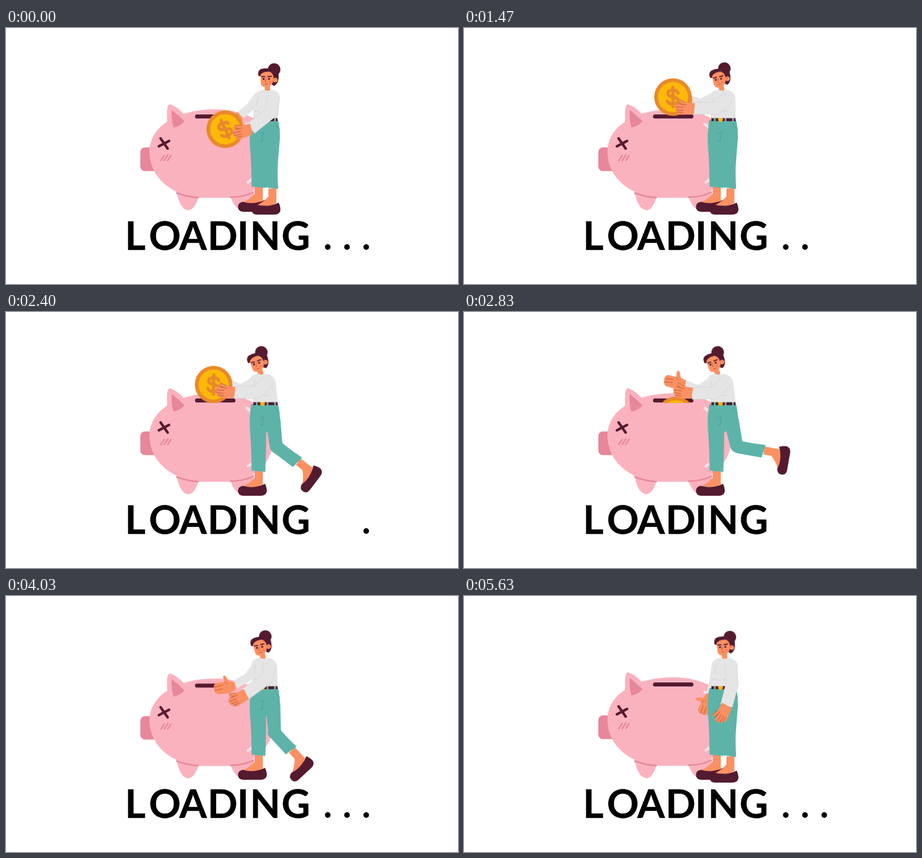
Write an HTML page that moves like this. It is 794 px wide and 450 px high and loops after 5.66 s.

```html
<!DOCTYPE html>
<html lang="en">
<head>
<meta charset="utf-8">
<title>Loading</title>
<style>
html, body { margin: 0; width: 100%; height: 100%; overflow: hidden; background: #fff; }
svg { display: block; width: 794px; height: 450px; }
text { font: 700 69.5px Lato, Inter, sans-serif; stroke: #000; stroke-width: .4; }

.pink { fill: #fbb2bf; }
.rose { fill: #e8869a; }
.skin { fill: #fb9062; }
.plum { fill: #541a30; }
.teal { fill: #5eb3a9; }
.cloth { fill: #e5e5e5; }
.line { fill: none; stroke-linecap: round; stroke-linejoin: round; }
.crease { stroke: #b9563f; stroke-width: 1; }
.fold { stroke: #d0d0d0; stroke-width: 1; }
.seam { stroke: #4b9c92; stroke-width: 1; }
.sleeve { fill: none; stroke: #e5e5e5; stroke-linejoin: round; }
.edge { stroke: #d2d2d2; }

.anim { animation: 5.66s linear infinite; }
.pig { animation-name: pig; transform-origin: 360px 320px; }
.coin { animation-name: coin; }
.front { animation-name: front; animation-timing-function: step-end; }
.slotted { animation-name: slotted; animation-timing-function: step-end; }
.torso { animation-name: torso; transform-origin: 456px 160px; }
.head { animation-name: head; transform-origin: 459px 108px; }
.thigh { animation-name: thigh; transform-origin: 462px 185px; }
.shank { animation-name: shank; transform-origin: 467px 238px; }
.far-arm { animation-name: far-arm; }
.far-hand { animation-name: far-hand; }
.near-arm { animation-name: near-arm; }
.near-hand { animation-name: near-hand; }
.dot { animation: 1886.667ms step-end infinite; }
.d1 { animation-name: dot1; }
.d2 { animation-name: dot2; }
.d3 { animation-name: dot3; }

@keyframes pig {
  0%, 51.5% { transform: scaleY(1); animation-timing-function: ease-out; }
  58% { transform: scaleY(.975); animation-timing-function: ease-in-out; }
  71.2% { transform: scaleY(.988); }
  81%, 100% { transform: scaleY(1); }
}
@keyframes coin {
  0%, 4% { transform: translate(385px, 178px) rotate(-25deg); animation-timing-function: cubic-bezier(.42, 0, .8, .7); }
  17.1% { transform: translate(374px, 142.5px) rotate(-6deg); animation-timing-function: ease-out; }
  30%, 35% { transform: translate(366px, 118px) rotate(0deg); }
  39% { transform: translate(363.5px, 119px) rotate(0deg); animation-timing-function: ease-in; }
  50% { transform: translate(372px, 181.5px) rotate(6deg); }
  53%, 100% { transform: translate(374px, 202px) rotate(8deg); }
}
@keyframes front { 0% { visibility: visible; } 36%, 100% { visibility: hidden; } }
@keyframes slotted { 0% { visibility: hidden; } 36%, 100% { visibility: visible; } }
@keyframes torso {
  0%, 4% { transform: skewX(0deg); animation-timing-function: ease-in; }
  17.1% { transform: skewX(-4deg); animation-timing-function: ease-in-out; }
  30%, 35% { transform: skewX(9deg); }
  48%, 60% { transform: skewX(12.4deg); animation-timing-function: ease-in; }
  71.2% { transform: skewX(7.5deg); animation-timing-function: ease-out; }
  85.3% { transform: skewX(1.5deg); }
  96%, 100% { transform: skewX(1deg); }
}
@keyframes head {
  0%, 4% { transform: none; animation-timing-function: ease-in; }
  17.1% { transform: translate(2.5px, 0) rotate(4deg); animation-timing-function: ease-in-out; }
  30%, 35% { transform: translate(-9px, 0) rotate(-15deg); }
  48%, 60% { transform: translate(-14px, 0) rotate(-18deg); animation-timing-function: ease-in; }
  71.2% { transform: translate(-8px, 0) rotate(-12deg); animation-timing-function: ease-out; }
  85.3% { transform: translate(-2px, 0) rotate(-5deg); }
  96%, 100% { transform: translate(-1.5px, 0) rotate(-4deg); }
}
@keyframes thigh {
  0%, 32% { transform: rotate(0deg); animation-timing-function: ease-in; }
  34.8% { transform: rotate(-1deg); animation-timing-function: ease-in-out; }
  48%, 64.6% { transform: rotate(-14deg); animation-timing-function: ease-in; }
  71.2% { transform: rotate(-6deg); animation-timing-function: ease-out; }
  82%, 100% { transform: rotate(0deg); }
}
@keyframes shank {
  0%, 32% { transform: translate(0, 0) rotate(0deg); animation-timing-function: ease-in; }
  34.8% { transform: translate(0, 0) rotate(-5.5deg); animation-timing-function: ease-in-out; }
  48%, 64.6% { transform: translate(3.3px, 2.4px) rotate(-66deg); animation-timing-function: ease-in; }
  71.2% { transform: translate(-1px, 2px) rotate(-37deg); animation-timing-function: ease-out; }
  82%, 100% { transform: translate(0, 0) rotate(0deg); }
}
@keyframes far-arm {
  0%, 4% { d: path("M444,118L429,139L411,154"); animation-timing-function: ease-in; }
  17.1% { d: path("M446,119L423,135L407,138"); animation-timing-function: ease-out; }
  30%, 35% { d: path("M441,119L415,132L399,125"); }
  48%, 60% { d: path("M439,119L412,137L388,127"); animation-timing-function: ease-in; }
  71.2% { d: path("M443,119L425,143L402,156"); animation-timing-function: ease-out; }
  85.3% { d: path("M443,118L437,145L427,171"); animation-timing-function: ease-out; }
  96%, 100% { d: path("M443,118L439,147L433,174"); }
}
@keyframes far-hand {
  0%, 4% { transform: translate(411px, 154px) rotate(-40deg); animation-timing-function: ease-in; }
  17.1% { transform: translate(407px, 138px) rotate(0deg); animation-timing-function: ease-out; }
  30%, 35% { transform: translate(399px, 125px) rotate(0deg); }
  48%, 60% { transform: translate(388px, 127px) rotate(10deg); animation-timing-function: ease-in; }
  71.2% { transform: translate(402px, 158px) rotate(-10deg); animation-timing-function: ease-out; }
  85.3% { transform: translate(427px, 171px) rotate(-65deg); animation-timing-function: ease-out; }
  96%, 100% { transform: translate(433px, 174px) rotate(-68deg); }
}
@keyframes near-arm {
  0%, 4% { d: path("M469,120L467,147L430,177"); animation-timing-function: ease-in; }
  17.1% { d: path("M471,121L468,147L415,154"); animation-timing-function: ease-out; }
  30%, 35% { d: path("M463,121L441,140L402,139"); }
  48%, 60% { d: path("M460,121L441,142L401,143"); animation-timing-function: ease-in; }
  71.2% { d: path("M464,120L458,145L421,172"); animation-timing-function: ease-out; }
  85.3% { d: path("M468,120L470,152L452,192"); animation-timing-function: ease-out; }
  96%, 100% { d: path("M469,120L471,155L461,193"); }
}
@keyframes near-hand {
  0%, 4% { transform: translate(430px, 177px) rotate(-14deg); animation-timing-function: ease-in; }
  17.1% { transform: translate(415px, 154px) rotate(0deg); animation-timing-function: ease-out; }
  30%, 35% { transform: translate(402px, 139px) rotate(5deg); }
  48%, 60% { transform: translate(400px, 142px) rotate(10deg); animation-timing-function: ease-in; }
  71.2% { transform: translate(421px, 172.5px) rotate(-25deg); animation-timing-function: ease-out; }
  85.3% { transform: translate(452px, 192px) rotate(-55deg); animation-timing-function: ease-out; }
  96%, 100% { transform: translate(461px, 193px) rotate(-59deg); }
}
@keyframes dot1 { 0%, 61.5%, 100% { visibility: visible; } 21.2% { visibility: hidden; } }
@keyframes dot2 { 0%, 76.3%, 100% { visibility: visible; } 27% { visibility: hidden; } }
@keyframes dot3 { 0%, 91.2%, 100% { visibility: visible; } 32.1% { visibility: hidden; } }
</style>
</head>
<body>
<svg viewBox="0 0 794 450">
  <defs>
    <clipPath id="above"><rect width="794" height="160"/></clipPath>
    <g id="money">
      <circle r="33" fill="#e8892b"/>
      <circle r="26.5" fill="#fcb908"/>
      <path class="line" stroke="#e8892b" stroke-width="5.5" d="M9,-7C7,-14 -9,-14 -9,-6.500C-9,2 9.500,-2 9.500,6.500C9.500,14 -8,14 -10,7M0,-17V17"/>
    </g>
    <g id="foot">
      <path class="skin" d="M437,277H451V303L440,308L416,307Q431,299 437,291Z"/>
      <path class="plum" d="M407.500,315Q407,307 416,305.500Q428,309 440,307Q449,305 455,302Q458.500,309 458,316Q456,323 448,323H416Q408,322 407.500,315Z"/>
    </g>
  </defs>

  <!-- piggy bank -->
  <g class="anim pig">
    <rect class="rose" x="236" y="210" width="32" height="41.500" rx="8"/>
    <path class="pink" d="M299,285Q305,320 321,320.500Q333,318 339,294ZM393,292Q400,318 415,320.500Q431,312 437,286Z"/>
    <path class="pink" d="M252,217C252,173 301,143 366,143C428,143 470,172 470,219C470,266 435,298.500 385,298.500H350C295,298.500 252,265 252,217Z"/>
    <path class="line" stroke="#e8869a" stroke-width="2.500" d="M300,290Q318,297 338,298M394,297.500Q418,297 434,289"/>
    <path class="pink" d="M284,175Q280,134 288,134Q300,137 314,153Z"/>
    <path class="rose" d="M291,144Q304,154 313.500,164Q306,173 294,175Q290,160 291,144Z"/>
    <path class="line" stroke="#541a30" stroke-width="4.500" d="M271.500,194L284,212M268.500,208L286.500,198.500"/>
    <path class="line" stroke="#e8869a" stroke-width="2.300" d="M272,233L278,224M278,233L284.500,223M284,233L290,224"/>
    <path class="line" stroke="#fddfe2" stroke-width="5" d="M423,169L432,176M425,271L434,265"/>
    <rect class="plum" x="332" y="152" width="71" height="7" rx="3.500"/>
  </g>

  <!-- far arm and coin -->
  <path class="anim far-arm sleeve" stroke-width="15" d="M444,118L429,139L411,154"/>
  <g class="anim far-hand">
    <path class="skin" d="M1,-7L-9,-10L-13,-20Q-16,-23 -18,-19L-17,-10L-32,-11Q-38,-8 -37,0Q-37,6 -33,9L-14,11L1,7Z"/>
    <path class="line crease" d="M-36,-4L-22,-5M-36,2L-22,1M-17,-10L-13,-5"/>
  </g>
  <g class="anim front"><use href="#money" class="anim coin"/></g>
  <g clip-path="url(#above)">
    <g class="anim slotted"><use href="#money" class="anim coin"/></g>
  </g>

  <!-- legs -->
  <use href="#foot"/>
  <path class="teal" d="M431,162H478Q482,180 480.500,194L457,212Q457,245 455.500,281L431.500,279Q431,235 428.500,208Q427,182 431,162Z"/>
  <g class="anim thigh">
    <path class="teal" d="M450,175L477,172Q482,180 481,195L477.500,238A11,11 0 0 1 455,238L455,200Z"/>
    <g class="anim shank">
      <use href="#foot" x="24" y="5"/>
      <circle class="teal" cx="466.200" cy="238" r="11.200"/>
      <path class="teal" d="M455,238H477.400Q476.500,260 478,283L455,280Z"/>
    </g>
  </g>
  <path class="line seam" d="M452,184L450,199M446,198L450,199M473,168Q475,176 481,178M446,186Q452,185 455,181"/>

  <!-- body -->
  <rect class="plum" x="434.500" y="157.500" width="42.500" height="6.300"/>
  <path class="teal" d="M439,157h3v7h-3zM458,157h3v7h-3zM471,157h3v7h-3z"/>
  <circle cx="450.500" cy="160.800" r="4.200" fill="#fcb908"/>
  <g class="anim head">
    <circle class="plum" cx="471" cy="73" r="11"/>
    <path class="plum" d="M443,82Q442,71 455,71Q475,70 479,82Q480,97 471,102L465,98L449,84Q443,86 443,82Z"/>
    <path class="skin" d="M454.500,98H464V110Q459,114 454.500,110Z"/>
    <path class="skin" d="M447,82Q452,76 464,77Q469,80 470,86L469,95Q465,104 457,104Q448,104 447.500,97Z"/>
    <circle class="skin" cx="473" cy="91.500" r="4"/>
    <path class="line" stroke="#541a30" stroke-width="1.800" d="M449,85.500L454.500,85.500M460,85.500L466,85"/>
    <path class="plum" d="M451,88h3v3h-3zM460.500,88h3v3h-3z"/>
    <path class="line crease" d="M457,88L455,94L457,95M455,98.500H460M462,95l2,1M471.500,91l2.500,-1"/>
  </g>
  <g class="anim torso">
    <path class="cloth" d="M452,108.500Q459,112 467,108.500Q480,111 481,122L477.500,158.500H434L436,124Q437,112 446,110Z"/>
    <path class="line fold" d="M436,147Q442,144 446,148M455,146Q460,149 465,145M443,122L440,136"/>
  </g>

  <!-- near arm -->
  <path class="anim near-arm sleeve edge" stroke-width="22" d="M469,120L467,147L430,177"/>
  <path class="anim near-arm sleeve" stroke-width="20.600" d="M469,120L467,147L430,177"/>
  <g class="anim near-hand">
    <path class="skin" d="M1,-9L-15,-9L-25,-13Q-29,-13 -27,-9L-20,-5L-29,-6Q-33,-5 -32,-1Q-34,2 -31,5Q-31,8 -28,9Q-28,13 -22,13L-10,12L1,10Z"/>
    <path class="line crease" d="M-32,0L-18,0M-31,5L-18,5M-28,9L-18,9M-27,-9L-20,-5L-14,-5M-28,-6L-20,-5M-26,-13L-15,-9"/>
  </g>

  <!-- caption -->
  <text x="209 251 304.500 354 406 428.500 484" y="390">LOADING</text>
  <circle class="dot d1" cx="565.200" cy="385" r="4.900"/>
  <circle class="dot d2" cx="599" cy="385" r="4.900"/>
  <circle class="dot d3" cx="632.800" cy="385" r="4.900"/>
</svg>
</body>
</html>
```
